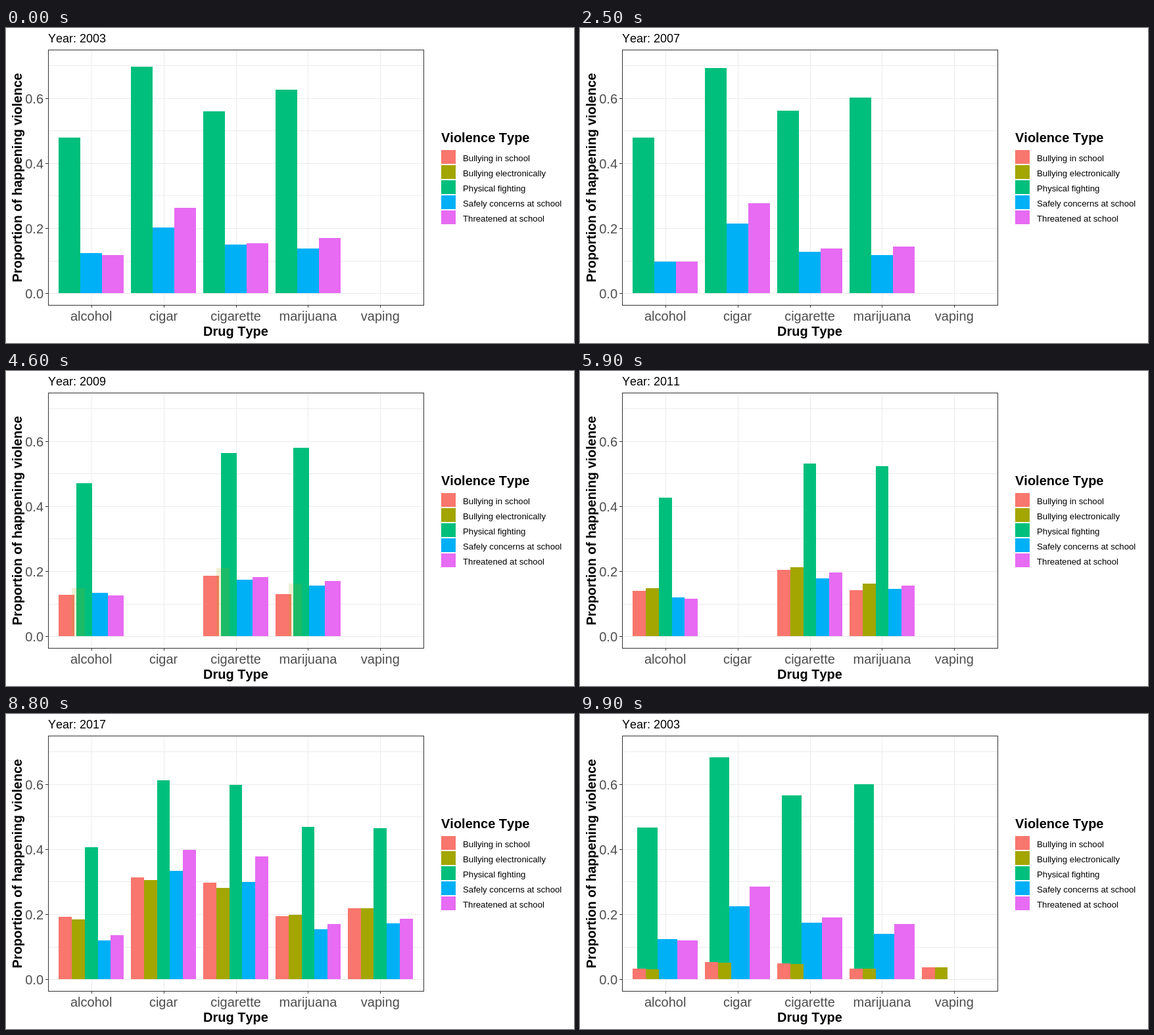
An HTML page with a canvas for the animation above (10 s loop, 864 px wide and 480 px high).

```html
<!DOCTYPE html>
<html lang="en">
<head>
<meta charset="utf-8">
<title>Violence by drug type</title>
<style>
  html, body { margin: 0; width: 100%; height: 100%; overflow: hidden; background: #fff; }
  canvas { display: block; }
</style>
</head>
<body>
<canvas id="chart" width="864" height="480"></canvas>
<script>
const ctx = document.getElementById("chart").getContext("2d");

// Each type follows a curve through a few years, in pixels, for the first drug.
// A type takes part from its first key year on.
const TYPES = [
  { name: "Bullying in school", color: "#F8766D", level: { 2009: 62, 2015: 80, 2017: 95 } },
  { name: "Bullying electronically", color: "#A3A500", level: { 2011: 73, 2015: 77, 2017: 91 } },
  { name: "Physical fighting", color: "#00BF7D", level: { 2003: 237, 2009: 237, 2015: 170, 2017: 201 } },
  { name: "Safely concerns at school", color: "#00B0F6", level: { 2003: 61, 2007: 48, 2009: 67, 2015: 46, 2017: 59 } },
  { name: "Threatened at school", color: "#E76BF3", level: { 2003: 58, 2007: 48, 2009: 63, 2015: 47, 2017: 67 } },
];

// Other drugs add a lift per type that drifts from the first year to the last.
const NONE = [0, 0, 0, 0, 0];
const VAPING = [13, 17, 29, 26, 25];
const always = () => true;
const DRUGS = [
  { name: "alcohol", from: NONE, to: NONE, power: 1, has: always },
  { name: "cigar", from: [60, 60, 108, 39, 72], to: [60, 60, 102, 106, 130], power: 1, has: y => y < 2009 || y > 2011 },
  { name: "cigarette", from: [27, 27, 40, 13, 18], to: [52, 48, 95, 89, 120], power: 3, has: always },
  { name: "marijuana", from: [1, 7, 73, 7, 26], to: [1, 7, 31, 17, 17], power: 1, has: always },
  { name: "vaping", from: VAPING, to: VAPING, power: 1, has: y => y > 2013 },
];

const FIRST_YEAR = 2003, LAST_YEAR = 2017;
const YEARS = Array.from({ length: 8 }, (_, i) => FIRST_YEAR + 2 * i);

// Time is counted in steps of 100 ms.
const STEP = 100, LOOP = 10000, MOVE = 6;
const STARTS = YEARS.map((_, i) => 7 + 13 * i - Math.max(0, i - 4));

const PANEL = { left: 64, top: 33, right: 635, bottom: 422 };
const BASE = 404, CENTER = 129.65, PITCH = 109.92, GROUP = 98.85;
const FONT = '"Liberation Sans", Arial, sans-serif';

const mix = (a, b, p) => a + (b - a) * p;
const firstKey = curve => Number(Object.keys(curve)[0]);

function sample(curve, year) {
  const keys = Object.keys(curve).map(Number);
  const end = Math.max(1, keys.findIndex(k => k >= year));
  const [a, b] = [keys[end - 1], keys[end]];
  return mix(curve[a], curve[b], (year - a) / (b - a));
}

function height(drug, type, year) {
  const u = (year - FIRST_YEAR) / (LAST_YEAR - FIRST_YEAR);
  return sample(TYPES[type].level, year) + mix(drug.from[type], drug.to[type], u ** drug.power);
}

// One row of bars per type in use; drugs without data keep an empty slot.
function layout(year) {
  const used = TYPES.map((_, i) => i).filter(i => firstKey(TYPES[i].level) <= year);
  const width = GROUP / used.length;
  return TYPES.map((_, type) => {
    const slot = used.indexOf(type);
    return slot < 0 ? null : DRUGS.map((drug, i) => {
      if (!drug.has(year)) return null;
      const x0 = CENTER + PITCH * i - GROUP / 2 + width * slot;
      return { type, x0, x1: x0 + width, h: height(drug, type, year) };
    });
  });
}

const STATES = YEARS.map(layout);

function rect(color, x, y, w, h) {
  ctx.fillStyle = color;
  ctx.fillRect(x, y, w, h);
}

function text(str, x, y, size, { bold = false, color = "#000", align = "left" } = {}) {
  ctx.font = `${bold ? "bold " : ""}${size}px ${FONT}`;
  ctx.textAlign = align;
  ctx.fillStyle = color;
  ctx.fillText(str, x, y);
}

function drawBar(bar, alpha = 1) {
  if (!bar) return;
  const left = Math.round(bar.x0), top = Math.round(BASE - bar.h);
  ctx.globalAlpha = alpha;
  rect(TYPES[bar.type].color, left, top, Math.round(bar.x1) - left, BASE - top);
  ctx.globalAlpha = 1;
}

function between(a, b, p) {
  if (p === 1) return b;
  if (!a || !b) return null;
  return { type: a.type, x0: mix(a.x0, b.x0, p), x1: mix(a.x1, b.x1, p), h: mix(a.h, b.h, p) };
}

// Shared types slide; types that leave shrink and new ones fade in, both on top.
function drawBars(from, to, p) {
  const types = TYPES.map((_, i) => i);
  const shared = types.filter(i => from[i] && to[i]);
  const leaving = types.filter(i => from[i] && !to[i]);
  const entering = types.filter(i => !from[i] && to[i]);
  for (const i of shared) from[i].forEach((a, d) => drawBar(between(a, to[i][d], p)));
  for (const i of leaving) from[i].forEach(a => drawBar(a && { ...a, h: a.h * (1 - p) }));
  for (const i of entering) to[i].forEach(b => drawBar(b, p));
}

const tickX = i => Math.round(130 + 109.8 * i);
const tickY = i => Math.round(404.05 - 99.08 * i);

function drawGrid() {
  const { left, top, right, bottom } = PANEL;
  for (let i = 0; i < 4; i += 0.5) rect("#EBEBEB", left, tickY(i), right - left, 1);
  DRUGS.forEach((_, i) => rect("#EBEBEB", tickX(i), top, 1, bottom - top));
}

function drawAxes() {
  const { left, top, right, bottom } = PANEL;
  ctx.strokeStyle = "#333";
  ctx.lineWidth = 1;
  ctx.strokeRect(left + 0.5, top + 0.5, right - left, bottom - top);
  for (let i = 0; i < 4; i++) {
    rect("#333", left - 4, tickY(i), 4, 1);
    text((i * 0.2).toFixed(1), 57, tickY(i) + 8, 20, { color: "#4D4D4D", align: "right" });
  }
  DRUGS.forEach(({ name }, i) => {
    rect("#333", tickX(i), bottom + 1, 1, 3);
    text(name, CENTER + PITCH * i, 446, 20, { color: "#4D4D4D", align: "center" });
  });
  text("Drug Type", 349.5, 469, 20, { bold: true, align: "center" });
  ctx.save();
  ctx.translate(24, 228);
  ctx.rotate(-Math.PI / 2);
  text("Proportion of happening violence", 0, 0, 20, { bold: true, align: "center" });
  ctx.restore();
}

function drawLegend() {
  text("Violence Type", 662, 174, 20, { bold: true });
  TYPES.forEach(({ name, color }, i) => {
    rect(color, 662, 186 + 23 * i, 22, 21);
    text(name, 695, 203 + 23 * i, 13.2);
  });
}

function draw(time) {
  const step = Math.floor((time % LOOP) / STEP);
  const moves = STARTS.filter(s => s <= step).length;
  const from = Math.max(0, moves - 1);
  const to = moves % YEARS.length;
  const p = moves ? Math.min(1, (step - STARTS[from] + 1) / MOVE) : 1;

  rect("#fff", 0, 0, 864, 480);
  ctx.fontKerning = "none";
  drawGrid();
  drawBars(STATES[from], STATES[to], p);
  drawAxes();
  drawLegend();
  text(`Year: ${YEARS[p > 0.5 ? to : from]}`, 64, 22, 18);
}

function tick() {
  draw(performance.now());
  requestAnimationFrame(tick);
}
tick();
</script>
</body>
</html>
```
